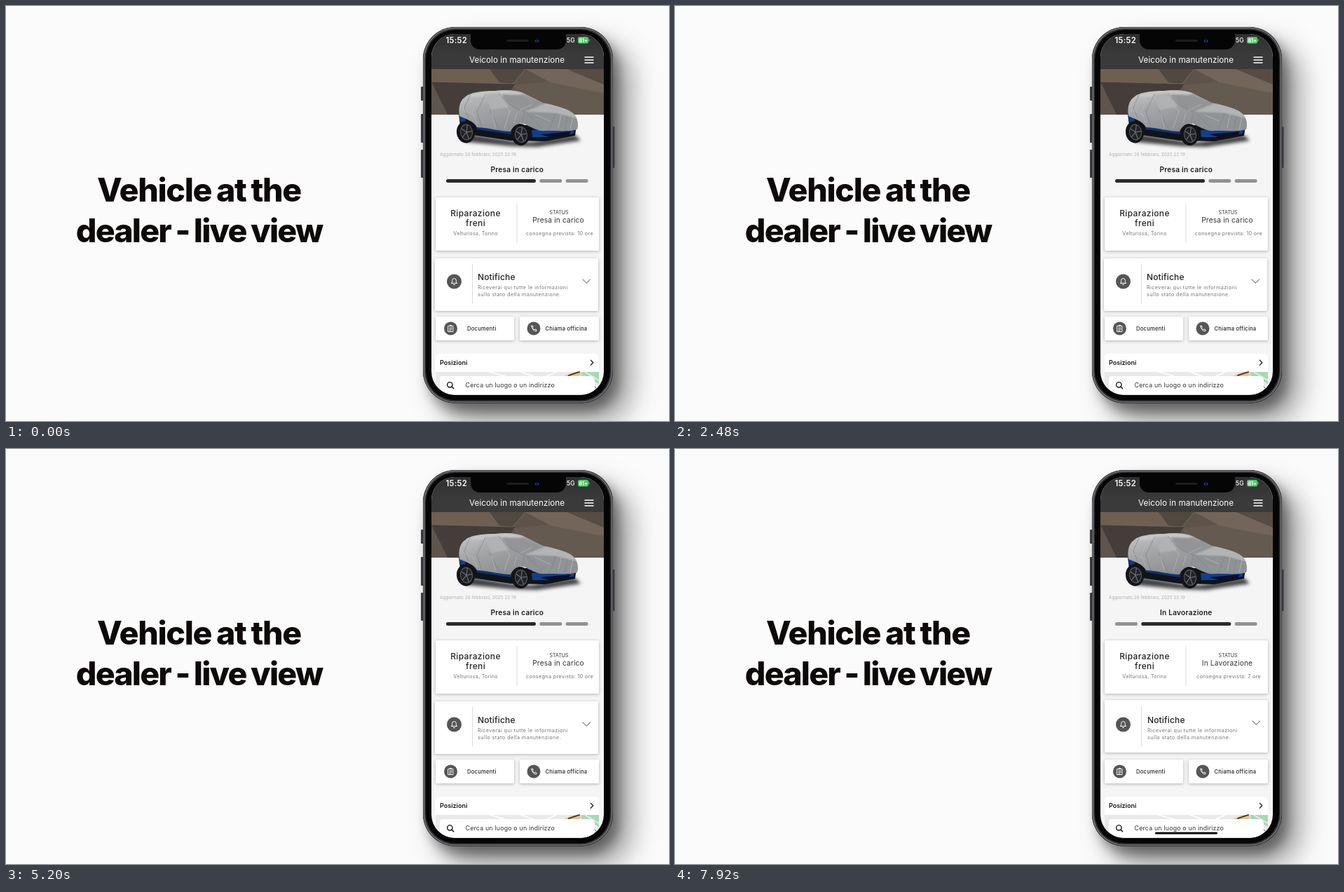
Write an HTML page with a canvas that moves like this. It is 946x592 px and loops after 8000 ms.

```html
<!DOCTYPE html>
<html lang="en">
<head>
<meta charset="utf-8">
<title>Vehicle live view</title>
<style>
html, body { margin: 0; width: 100%; height: 100%; overflow: hidden; background: #fbfbfb; }
canvas { display: block; width: 946px; height: 592px; }
</style>
</head>
<body>
<canvas id="stage"></canvas>
<script>
const W = 946, H = 592, LOOP = 8000, SWITCH = 5760;
const cv = document.getElementById('stage');
const ratio = window.devicePixelRatio || 1;
cv.width = W * ratio;
cv.height = H * ratio;
const c = cv.getContext('2d');
c.scale(ratio, ratio);

const STATES = [
  { label: 'Presa in carico', hours: 10, active: 0, dx: 0, dy: 0, home: false },
  { label: 'In Lavorazione', hours: 7, active: 1, dx: 1, dy: -2, home: true }
];

function box(x, y, w, h, r, fill) {
  c.beginPath();
  c.roundRect(x, y, w, h, r);
  c.fillStyle = fill;
  c.fill();
}

function withShadow(color, blur, x, y, draw) {
  c.save();
  c.shadowColor = color;
  c.shadowBlur = blur * ratio;
  c.shadowOffsetX = x * ratio;
  c.shadowOffsetY = y * ratio;
  draw();
  c.restore();
}

function card(x, y, w, h, r = 2) {
  withShadow('rgba(0,0,0,.28)', 4, 0, 1, () => box(x, y, w, h, r, '#fff'));
}

function poly(fill, ...p) {
  c.beginPath();
  for (let i = 0; i < p.length; i += 2) c.lineTo(p[i], p[i + 1]);
  c.closePath();
  c.fillStyle = fill;
  c.fill();
}

function stroke(path, color, width = 1) {
  c.strokeStyle = color;
  c.lineWidth = width;
  c.lineCap = c.lineJoin = 'round';
  c.stroke(new Path2D(path));
}

function shape(path, fill) {
  c.fillStyle = fill;
  c.fill(new Path2D(path));
}

function disc(x, y, rx, fill, ry = rx, tilt = 0) {
  c.beginPath();
  c.ellipse(x, y, rx, ry, tilt, 0, Math.PI * 2);
  c.fillStyle = fill;
  c.fill();
}

function text(s, x, y, size, color, weight = 400, gap = 0, align = 'left') {
  c.font = `${weight} ${size}px Inter, "Open Sans", sans-serif`;
  c.letterSpacing = gap + 'px';
  c.textAlign = align;
  c.fillStyle = color;
  c.fillText(s, x, y);
}

const mid = (s, x, y, size, color, weight, gap) =>
  text(s, x, y, size, color, weight, gap, 'center');

function backdrop() {
  c.fillStyle = '#fbfbfb';
  c.fillRect(0, 0, W, H);
  c.wordSpacing = '-2px';
  mid('Vehicle at the', 275.5, 279, 46.5, '#0e0909', 800, -1.3);
  mid('dealer - live view', 275.5, 337, 46.5, '#0e0909', 800, -1.8);
  c.wordSpacing = '0px';
}

function phoneBody() {
  const body = () => box(595, 30, 271, 536.5, 46, '#3a3b3e');
  withShadow('rgba(0,0,0,.42)', 40, 24, 26, body);
  withShadow('rgba(0,0,0,.35)', 16, 8, 12, body);
  for (const [y, h] of [[115, 20], [154, 41], [205, 40]]) box(592, y, 3.5, h, 1, '#3b3c3f');
  box(865.5, 172, 3, 59, 1, '#3b3c3f');
  box(595, 30, 271, 536.5, 46, '#3a3b3e');
  box(596, 31, 269, 534.5, 45, '#85868a');
  box(597, 32, 267, 532.5, 44, '#36373a');
  box(599, 34, 263, 528.5, 42, '#050506');
}

function wheel(x, y) {
  disc(x, y, 13, '#131418', 15.5, -.12);
  disc(x + 1, y, 9, '#5c5f64', 11.5, -.12);
  disc(x + 1, y, 8, '#202226', 10.3, -.12);
  for (let i = 0; i < 5; i++) {
    const a = i * Math.PI * .4 - 1.4;
    stroke(`M${x + 1} ${y}L${x + 1 + 7.5 * Math.cos(a)} ${y + 10 * Math.sin(a)}`, '#6c6f74', 1.2);
  }
}

function hero() {
  c.fillStyle = '#5f5349';
  c.fillRect(607, 90, 246, 65);
  poly('#6e5f51', 607, 90, 734, 90, 716, 111, 607, 108);
  poly('#453d39', 607, 108, 726, 111, 700, 155, 607, 155);
  poly('#5f554e', 607, 108, 630, 155, 607, 155);
  poly('#51483f', 690, 90, 740, 90, 722, 111, 704, 109);
  poly('#73655a', 741, 90, 853, 90, 853, 124, 775, 108);
  poly('#655a50', 725, 113, 775, 108, 853, 126, 853, 155, 735, 155);
  poly('#564c44', 800, 90, 853, 90, 853, 112);
  stroke('M607 108L724 111L741 90M775 108L853 125', '#7d6f62', .6);
}

function car() {
  c.save();
  c.filter = 'blur(2.5px)';
  poly('rgba(20,20,23,.8)', 648, 183, 672, 184, 722, 192, 748, 194, 812, 184, 820, 192, 758, 201, 722, 200, 658, 194);
  c.restore();
  poly('#10131a', 646, 154, 668, 166, 744, 170, 814, 170, 812, 185, 770, 193, 720, 192, 666, 184, 648, 171);
  poly('#123c84', 647, 156, 656, 161, 655, 166, 648, 165);
  poly('#12336c', 671, 172, 722, 179, 721, 183, 672, 176);
  poly('#123f8c', 750, 177, 812, 176, 809, 182, 778, 187, 751, 187);
  poly('#0b1020', 762, 183, 806, 179, 803, 184, 778, 188);
  wheel(656, 180);
  wheel(734, 183.5);

  const cover = 'M647 157C645 145 648 134 655 130C662 123 680 121 698 121C714 119 730 120 740 125' +
    'L766 138C784 142 801 146 809 153C816 159 817 170 815 176C800 180 784 177 770 178' +
    'C759 179 752 174 745 171C735 164 725 168 720 179C706 179 690 174 672 173C667 164 656 161 647 157Z';
  c.save();
  c.clip(new Path2D(cover));
  const g = c.createLinearGradient(690, 118, 712, 182);
  g.addColorStop(0, '#bdbebe');
  g.addColorStop(.35, '#a3a5a7');
  g.addColorStop(1, '#8b8d90');
  c.fillStyle = g;
  c.fillRect(640, 115, 180, 70);
  c.filter = 'blur(1px)';
  shape('M655 130C675 120 720 117 740 125L724 130C700 126 675 130 655 130Z', '#c6c6c5');
  shape('M684 126L704 124L717 144L692 148Z', '#b0b1b2');
  shape('M707 126L738 127L767 139L742 151L722 145Z', '#929496');
  shape('M740 151L772 138C798 142 815 151 817 161L784 153Z', '#b2b3b4');
  shape('M742 152L784 154L817 163L815 180L770 178L745 171Z', '#909396');
  c.filter = 'none';
  stroke('M684 126L672 151L679 173M704 125Q718 144 740 151L736 168M662 127L654 145L660 160' +
    'M690 148L704 176M742 151L764 174M784 154L775 177M801 158L797 178', '#7f8286', .7);
  stroke('M676 130L665 151L672 168M698 129L719 150L711 174M751 140L733 149M693 153L698 173' +
    'M729 153L725 166M755 155L776 164M792 155L788 174M809 159L805 176M652 148L670 157', '#b9babc', .7);
  c.restore();
}

function statusBar() {
  const g = c.createLinearGradient(0, 40, 0, 70);
  g.addColorStop(0, '#2f2f30');
  g.addColorStop(1, '#3a3a3b');
  c.fillStyle = g;
  c.fillRect(607, 38, 246, 52);
  box(663, 30, 136, 32, [0, 0, 13, 13], '#050506');
  box(714, 48, 32, 3, 1.5, '#1d1d20');
  disc(757.5, 50, 3, '#0c1330');
  disc(755.8, 50, .9, '#274cae');
  disc(759.4, 50, .9, '#274cae');
  text('15:52', 627.5, 52.5, 11.2, '#fff', 600, .3);
  text('5G', 800, 52, 8.5, '#fff', 500);
  box(816, 44, 15, 9.5, 2.5, '#4fc967');
  box(831.4, 47, 1.2, 3.5, .6, '#4fc967');
  mid('81+', 823.6, 51.5, 7.3, '#fff', 700, -.2);
  text('Veicolo in manutenzione', 661, 81, 11.7, '#fff', 400, .05);
  stroke('M826 73H838M826 77H838M826 81H838', '#fff', 1.4);
}

function progress(active) {
  let x = 628;
  for (let i = 0; i < 3; i++) {
    const w = i === active ? 128 : 32;
    box(x, 247, w, 5, 2.5, i === active ? '#292a2b' : '#929292');
    x += w + 5.3;
  }
}

function jobCard(s) {
  card(613, 273, 233, 76);
  stroke('M729 282V338', '#dcdcdc', 1);
  mid('Riparazione', 670, 300, 12, '#252525', 500, .35);
  mid('freni', 670, 314, 12, '#252525', 500, .35);
  mid('Velturissa, Torino', 670, 327, 7.2, '#757575', 400, .25);
  mid('STATUS', 789, 297, 7, '#333');
  mid(s.label, 788, 309, 10.2, '#333', 400, .15);
  mid(`consegna prevista: ${s.hours} ore`, 790, 327, 7.3, '#757575', 400, .3);
}

function notices({ dx, dy }) {
  card(612 + dx, 360 + dy, 233, 75);
  stroke('M665.5 368V424', '#dcdcdc', 1);
  disc(639.5, 393, 10.5, '#565656');
  stroke('M635.5 395.5H643.5L642.3 393.8V391.5Q642.3 388.6 639.5 388.6Q636.7 388.6 636.7 391.5V393.8ZM638.6 397.5H640.4', '#fff', 1);
  const x = 673 + dx;
  text('Notifiche', x, 391, 12, '#222', 500, .15);
  text('Riceverai qui tutte le informazioni', x, 404, 7.3, '#777', 400, .4);
  text('sullo stato della manutenzione.', x, 414, 7.3, '#777', 400, .4);
  const cx = 823 + dx, cy = 390 + dy;
  stroke(`M${cx} ${cy}l5.3 5.3l5.3 -5.3`, '#888', 1.1);
}

function buttons() {
  card(613, 443, 112, 34);
  card(733, 443, 113, 34);
  disc(634.5, 460, 9.5, '#565656');
  stroke('M631 456.5H638V464.5H631ZM633.3 456.3V455.3H635.7V456.3M632.7 459H636.3M632.7 461H636.3M632.7 463H635', '#fff', .9);
  disc(753, 460, 9.5, '#565656');
  stroke('M749.7 456.4L751.3 456L752.4 458.4L751.3 459.5Q752.2 461.2 753.8 462L754.9 460.9L757 462L756.7 463.8Q752 464.5 749.7 456.4Z', '#fff', 1);
  text('Documenti', 658, 462.5, 7.6, '#222', 500, .25);
  text('Chiama officina', 769.5, 462.5, 7.6, '#222', 500, .22);
}

function places(home) {
  box(613, 496, 233, 26, [5, 5, 0, 0], '#fff');
  text('Posizioni', 619, 512, 9, '#191919', 600);
  stroke('M834.3 505.3L837.8 508.8L834.3 512.3', '#222', 1.3);
  c.fillStyle = '#e9e9e9';
  c.fillRect(613, 522, 233, 33);
  stroke('M690 522L712 528M735 522L752 528M772 528L785 522', '#fff', 1.5);
  poly('#a9d8b4', 821, 522, 846, 522, 846, 539, 834, 532, 821, 528);
  stroke('M826 522L846 534', '#e4efe0', 1.5);
  poly('#e2c58d', 796, 528, 810, 522, 820, 522, 820, 527, 816, 528);
  stroke('M803 527L818 522', '#302820', 1.8);
  box(619, 528, 221, 30, [4, 6, 0, 0], '#fff');
  stroke('M840 543L844 547', '#555', .9);
  c.beginPath();
  c.arc(633.3, 540.3, 3.7, 0, Math.PI * 2);
  c.strokeStyle = '#161616';
  c.lineWidth = 1.4;
  c.stroke();
  stroke('M636.2 543.2L638.6 545.6', '#161616', 1.5);
  text('Cerca un luogo o un indirizzo', 655.5, 544, 8.8, '#333', 400, .2);
  if (home) box(685, 546.5, 89, 3, 1.5, '#0a0a0a');
}

function screen(s) {
  c.save();
  c.beginPath();
  c.roundRect(607, 40, 246, 514.5, 33);
  c.clip();
  c.fillStyle = '#f5f5f5';
  c.fillRect(607, 40, 246, 515);
  hero();
  car();
  statusBar();
  text('Aggiornato 26 febbraio, 2025 22:19', 619, 214, 6.4, '#b0b0b0', 400, .05);
  mid(s.label, 729.3, 237, 10.1, '#1b1b1b', 600, .25);
  progress(s.active);
  jobCard(s);
  notices(s);
  buttons();
  places(s.home);
  c.restore();
}

function frame(now) {
  backdrop();
  phoneBody();
  screen(STATES[now % LOOP < SWITCH ? 0 : 1]);
  requestAnimationFrame(() => frame(performance.now()));
}
frame(performance.now());
</script>
</body>
</html>
```
